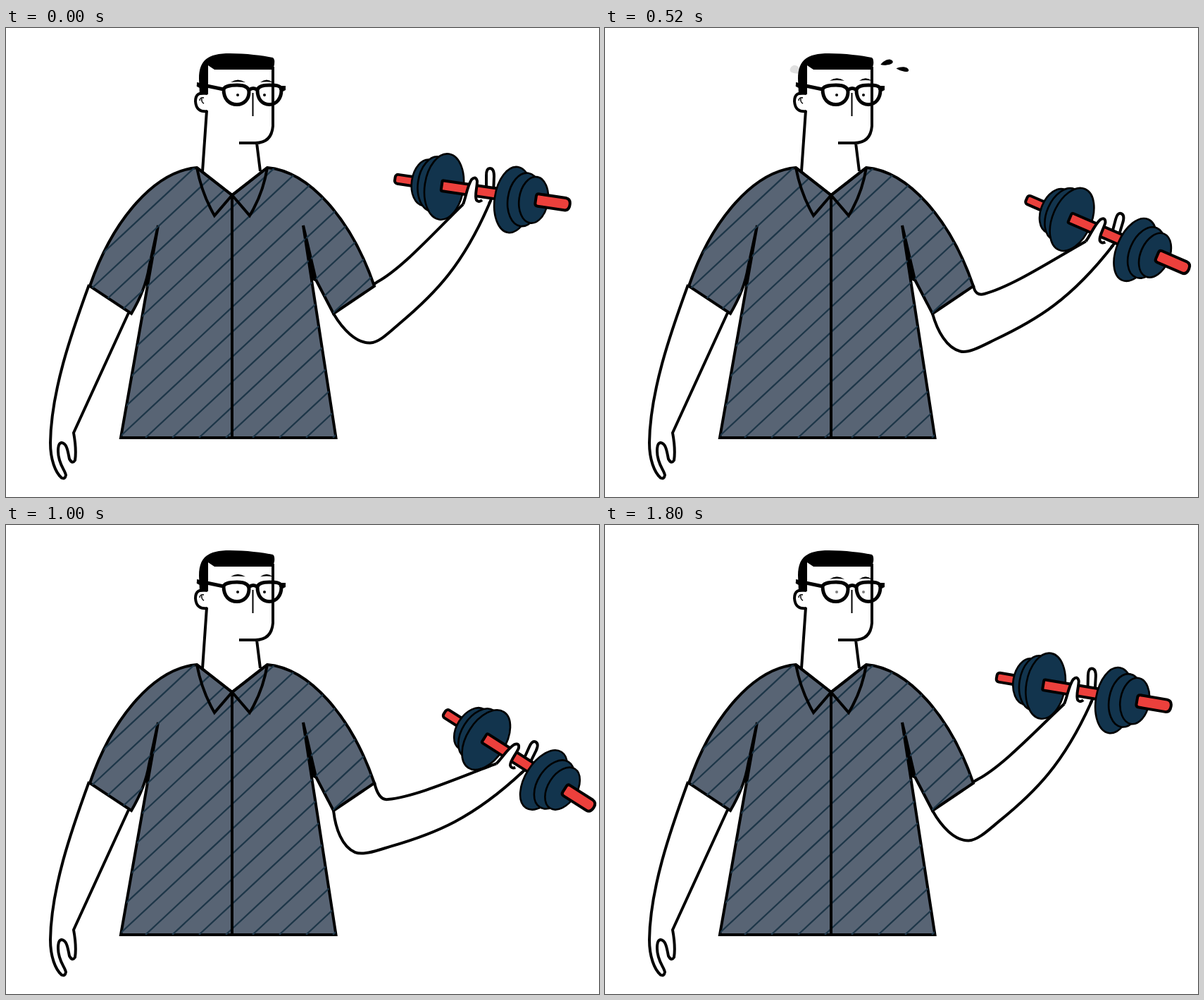
An HTML page that plays this animation: 842x665 px, repeating every 1840 ms.

```html
<!DOCTYPE html>
<html lang="en">
<head>
<meta charset="utf-8">
<title>Dumbbell curl</title>
<style>
  html, body { margin: 0; width: 100%; height: 100%; overflow: hidden; background: #fff; }
  svg { display: block; width: 100vw; height: 100vh; }
  .line { fill: none; stroke: #000; stroke-width: 4; }
  .skin { fill: #fff; stroke: #000; stroke-width: 4; stroke-linejoin: round; }
  .plate { fill: #12344d; stroke: #000; stroke-width: 2.6; }
  .bar { fill: #ec403c; stroke: #000; stroke-width: 4; }
</style>
</head>
<body>
<svg viewBox="0 0 842 665">
  <defs>
    <path id="shirt" d="M271 198C212 203 152 270 119 366L178 405Q198 371 203 340L216 280L163 581H468.5L422 280L440 357L465 405L523 366C490 270 430 203 371 198L321 237Z"/>
    <clipPath id="shirtClip"><use href="#shirt"/></clipPath>
  </defs>

  <g id="drops"></g>

  <!-- resting arm -->
  <path class="skin" d="M118 364C92 435 64 516 63 588C63 612 70 630 79 638Q84 640 85 634C84 627 74 618 74 600Q74 588 79 588C87 589 88 602 90 611Q94 619 98 613C100 600 98 585 96 574L174 404"/>

  <!-- lifting arm -->
  <g id="backWeight">
    <g transform="translate(676 232) rotate(8.4)">
      <rect class="bar" x="-125" y="-6.5" width="45" height="13" rx="4"/>
      <ellipse class="plate" cx="-80" cy="-1" rx="21" ry="33"/>
      <ellipse class="plate" cx="-68" cy="-1" rx="24" ry="39"/>
      <ellipse class="plate" cx="-54.4" cy="1" rx="27.5" ry="47"/>
    </g>
  </g>
  <path id="forearmFill" fill="#fff"/>
  <path id="forearm" class="line"/>
  <g id="frontWeight">
    <path class="skin" d="M682 240V209Q682 199 687 199Q693 199 693 210L692 236L686 249"/>
    <g transform="translate(676 232) rotate(8.4)">
      <rect class="bar" x="-58" y="-7.5" width="82" height="15" rx="2"/>
    </g>
    <path class="skin" d="M649 250C653 240 655 224 661 215Q667 209 669 217C669 227 665 238 668 244Q671 248 676 244"/>
    <g transform="translate(676 232) rotate(8.4)">
      <ellipse class="plate" cx="45" cy="5" rx="26" ry="47"/>
      <ellipse class="plate" cx="61" cy="2.5" rx="23.5" ry="38"/>
      <ellipse class="plate" cx="74" cy="1" rx="20.5" ry="33"/>
      <path class="bar" d="M81 -8.5H119Q126 -8 126 0Q126 9 119 9H81Q77 9 77 5V-5Q77 -8.5 81 -8.5Z"/>
    </g>
  </g>

  <!-- head -->
  <path fill="#fff" d="M285 50H379V139Q379 163 354 163H356L361 203L321 237L279 203Z"/>
  <path class="line" d="M285 117L279 203M356 163L361 203M379 55V139Q377 163 354 163H331"/>
  <path class="skin" d="M286 93Q269 89 269 104Q270 120 286 118"/>
  <path class="line" style="stroke-width:1.5" d="M275 103Q275 98 281 99M278 100Q277 105 281 107"/>
  <path d="M275 95L274 72C274 46 286 36 318 36C340 36 365 39 379 42Q382 44 381 52L379 59H296L287 53V94Z"/>
  <path id="brows" d="M319 77Q329 70 340 77Q329 75.5 319 77ZM361 77Q370 70 379 77Q370 75.5 361 77Z"/>
  <g id="pupils"><circle cx="329" cy="95" r="2"/><circle cx="367" cy="95" r="2"/></g>
  <path class="line" style="stroke-width:2" d="M350.5 92V125"/>
  <path class="line" style="stroke-width:5" d="M271 80L285 82L309 87C310 83 318 81 328 81C338 81 345 84 345 91C345 101 338 108.5 328 108.5C317 108.5 309 101 309 87M345 88Q351 83 357 88C358 83 364 81 374 81C385 81 391 82 391 88C391 100 384 108.5 374 108.5C363 108.5 357 100 357 88M388 85.5H397"/>
  <path d="M388 82H397V88L391 91ZM271 77L275 78V85L271 83Z"/>

  <!-- shirt -->
  <use href="#shirt" fill="#586474" stroke="#000" stroke-width="4"/>
  <path id="stripes" clip-path="url(#shirtClip)" fill="none" stroke="#1d3648" stroke-width="2.3"/>
  <path class="line" d="M271 198Q278 235 296 266L321 237L346 266Q365 235 371 198M321 237V579M271 198L321 237L371 198"/>
  <path d="M216 280L203 357L197 368L203 335ZM422 280L434 357L441 360L432 325Z"/>
</svg>
<script>
const LOOP = 1840, STEP = 40, PEAK = 26.35;
const PIVOT = [465, 405];
const byId = id => document.getElementById(id);

let stripes = '';
for (let x = -296; x < 480; x += 38) stripes += `M${x} 581l430 -400`;
byId('stripes').setAttribute('d', stripes);

// Sweat drops: start time and quadratic flight path
const FLIGHT = 480;
const drops = [
  { start: 140, path: [[382, 68], [408, 47.6], [433, 63]] },
  { start: 372, path: [[384, 58], [409, 39.4], [439, 47]] },
  { start: 508, path: [[273, 60], [246, 45.6], [217, 54]] }
];
for (const drop of drops) {
  drop.el = document.createElementNS('http://www.w3.org/2000/svg', 'path');
  drop.el.setAttribute('d', 'M-9 1C-5 -3 3 -5 6 -3C10 -1 10 3 5 3.5C0 4 -6 3 -9 1Z');
  byId('drops').append(drop.el);
}

function drawDrop({ start, path: [a, b, c], el }, time) {
  const age = time - start, u = age / FLIGHT, v = 1 - u;
  const fade = Math.max(0, Math.min(1, age / 100, (FLIGHT - age) / 100));
  el.setAttribute('opacity', fade);
  if (!fade) return;
  const [x, y] = [0, 1].map(i => v * v * a[i] + 2 * u * v * b[i] + u * u * c[i]);
  const [dx, dy] = [0, 1].map(i => v * (b[i] - a[i]) + u * (c[i] - b[i]));
  const side = Math.sign(dx);
  const tilt = 0.6 * Math.atan2(dy, Math.abs(dx)) * 180 / Math.PI;
  const thick = Math.max(0.85, 1.6 - 2 * u);
  el.setAttribute('transform', `translate(${x} ${y}) scale(${side} 1) rotate(${tilt}) scale(1 ${thick})`);
}

function drawForearm(angle) {
  const r = angle * Math.PI / 180, cos = Math.cos(r), sin = Math.sin(r);
  const at = (x, y) => {
    const dx = x - PIVOT[0], dy = y - PIVOT[1];
    return `${PIVOT[0] + dx * cos - dy * sin} ${PIVOT[1] + dx * sin + dy * cos} `;
  };
  // The crease stretches between the turning forearm and the fixed sleeve corner
  const inner = `M523 365Q${at(517.5, 366)}${at(529, 359)}C${at(564, 339)}${at(608, 290)}${at(649, 250)}`;
  const outer = `${at(688, 245)}C${at(650, 335)}${at(610, 376)}${at(560, 418)}` +
    `C${at(545, 431)}${at(530, 446)}${at(517, 446.5)}C${at(497, 447)}${at(478, 427)}${at(465, 405)}`;
  byId('forearm').setAttribute('d', `${inner}M${outer}`);
  byId('forearmFill').setAttribute('d', `${inner}L${at(676, 240)}L${outer}Z`);
}

function draw(now) {
  const time = Math.floor(now % LOOP / STEP) * STEP;
  const lift = 1 - Math.abs(1 - 2 * time / LOOP);
  const angle = PEAK * lift;
  const turn = `rotate(${angle} ${PIVOT})`;
  byId('backWeight').setAttribute('transform', turn);
  byId('frontWeight').setAttribute('transform', turn);
  drawForearm(angle);
  byId('brows').setAttribute('transform', `translate(0 ${-4 * lift})`);
  byId('pupils').setAttribute('opacity', time >= 1800 ? 0.5 : 1);
  drops.forEach(drop => drawDrop(drop, time));
}

const begin = performance.now();
function tick() {
  draw(performance.now() - begin);
  requestAnimationFrame(tick);
}
tick();
</script>
</body>
</html>
```
